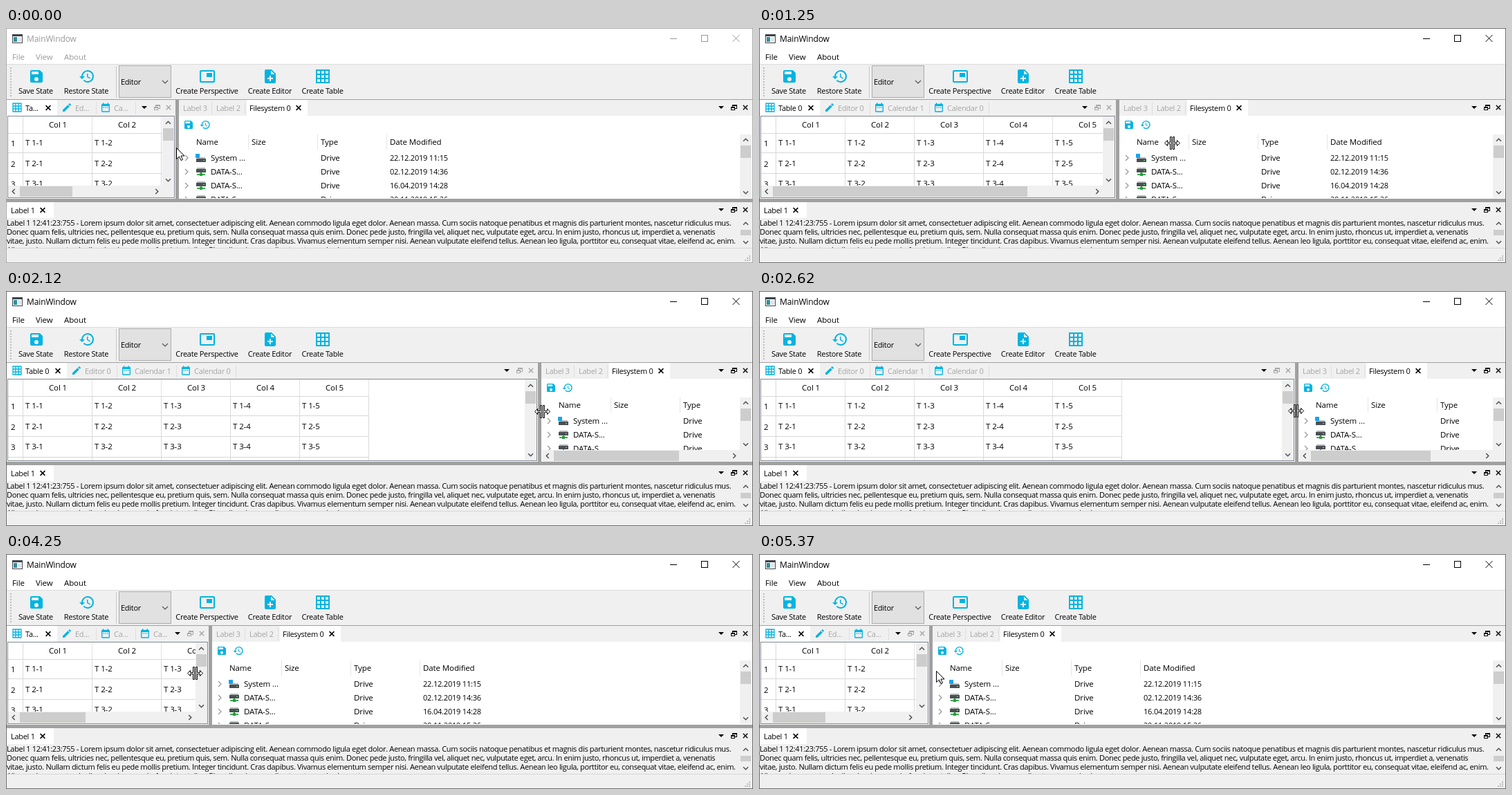
Write an HTML page with a canvas that moves like this. It is 1080x340 px and loops after 6.25 s.

```html
<!DOCTYPE html>
<html lang="en">
<head>
<meta charset="utf-8">
<title>MainWindow</title>
<style>
html, body { margin: 0; width: 100%; height: 100%; overflow: hidden; background: #f0f0f0; }
canvas { display: block; }
</style>
</head>
<body>
<canvas id="stage" width="1080" height="340"></canvas>
<script>
const g = document.getElementById('stage').getContext('2d');
const W = 1080, H = 340, LOOP = 6250, STEP = 125;
const BLUE = '#00b4e1', BG = '#f0f0f0', SPLIT = '#a0a0a0', MUTED = '#a6a6a6';

const FAMILY = '"Open Sans", "Noto Sans", sans-serif';
const UI = ['11.5px ' + FAMILY, '-0.1px'];
const SMALL = ['11px ' + FAMILY, '-0.28px'];
const LOG = ['11px ' + FAMILY, '-0.335px'];

// Splitter positions, one per step; the pointer runs one step ahead.
const OUT = [245, 262, 335, 430, 516, 594, 667, 727, 754, 754, 758, 769, 772, 774, 775, 775, 773];
const BACK = [772, 637, 502, 445, 382, 325, 293, 270, 258, 252, 249, 248, 248, 247, 246, 246, 246];
const OUT_Y = [[0, 174], [4, 166], [8, 174], [15, 173]];
const BACK_Y = [[0, 173], [2, 176], [6, 172], [11, 172], [15, 169]];

const ICON = {
  save: 'M17 3H5a2 2 0 0 0-2 2v14a2 2 0 0 0 2 2h14a2 2 0 0 0 2-2V7zM12 19a3 3 0 1 1 0-6 3 3 0 0 1 0 6zM15 9H5V5h10z',
  history: 'M13 3a9 9 0 0 0-9 9H1l4 4 4-4H6a7 7 0 1 1 2.06 4.94l-1.42 1.42A9 9 0 1 0 13 3zM12 8v5l4.28 2.54.72-1.21-3.5-2.08V8z',
  view: 'M3 3h18a2 2 0 0 1 2 2v14a2 2 0 0 1-2 2H3a2 2 0 0 1-2-2V5a2 2 0 0 1 2-2zM3 5v14h18V5zM11 7h8v6h-8z',
  note: 'M6 2a2 2 0 0 0-2 2v16a2 2 0 0 0 2 2h12a2 2 0 0 0 2-2V8l-6-6zM13 9V3.5L18.5 9zM16 16h-3v3h-2v-3H8v-2h3v-3h2v3h3z',
  pencil: 'M3 17.2V21h3.8L17.8 9.9 14.1 6.2zM20.7 7a1 1 0 0 0 0-1.4l-2.3-2.3a1 1 0 0 0-1.4 0l-1.8 1.8 3.7 3.7z',
  date: 'M19 4h-1V2h-2v2H8V2H6v2H5a2 2 0 0 0-2 2v14a2 2 0 0 0 2 2h14a2 2 0 0 0 2-2V6a2 2 0 0 0-2-2zM19 20H5V9h14zM7 11h2v2H7zM11 11h2v2h-2zM15 11h2v2h-2z',
  grid: 'M2 2h20v20H2z' + [4, 10, 16].map(x => [4, 10, 16].map(y => `M${x} ${y}h4v4h-4z`).join('')).join('')
};
for (const k in ICON) ICON[k] = new Path2D(ICON[k]);

const lerp = (a, b, f) => a + (b - a) * f;
const clamp = (v, a, b) => Math.max(a, Math.min(b, v));

function ramp(keys, k) {
  for (let i = 1; i < keys.length; i++) {
    const [a, u] = keys[i - 1], [b, v] = keys[i];
    if (k <= b) return Math.round(lerp(u, v, (k - a) / (b - a)));
  }
  return keys[keys.length - 1][1];
}

function box(x, y, w, h, color) {
  g.fillStyle = color;
  g.fillRect(x, y, w, h);
}

function frame(x, y, w, h, color) {
  g.strokeStyle = color;
  g.lineWidth = 1;
  g.strokeRect(x + .5, y + .5, w - 1, h - 1);
}

function setFont([font, spacing]) {
  g.font = font;
  g.letterSpacing = spacing;
}

function text(s, x, y, style = UI, color = '#000', align = 'left') {
  setFont(style);
  g.fillStyle = color;
  g.textAlign = align;
  g.fillText(s, x, y);
}

function elide(s, width, style) {
  setFont(style);
  if (g.measureText(s).width <= width) return s;
  let n = s.length - 1;
  while (n > 2 && g.measureText(s.slice(0, n) + '...').width > width) n--;
  return s.slice(0, n) + '...';
}

function icon(name, x, y, size = 24) {
  g.save();
  g.translate(x, y);
  g.scale(size / 24, size / 24);
  g.fillStyle = BLUE;
  g.fill(ICON[name], 'evenodd');
  g.restore();
}

function line(color, width, ...p) {
  g.beginPath();
  for (let i = 0; i < p.length; i += 2) g.lineTo(p[i], p[i + 1]);
  g.strokeStyle = color;
  g.lineWidth = width;
  g.stroke();
}

function poly(p) {
  g.beginPath();
  p.forEach(([x, y]) => g.lineTo(x, y));
  g.closePath();
}

function clipped(x, y, w, h, draw) {
  g.save();
  g.beginPath();
  g.rect(x, y, w, h);
  g.clip();
  draw();
  g.restore();
}

function cross(x, y, r, color, width = 1.5) {
  line(color, width, x - r, y - r, x + r, y + r);
  line(color, width, x + r, y - r, x - r, y + r);
}

// Chevron pointing along (dx, dy).
function chevron(x, y, dx, dy, color = '#505050', r = 3.5, width = 1.5) {
  const h = r / 2;
  line(color, width, x - dx * h - dy * r, y - dy * h - dx * r, x + dx * h, y + dy * h,
    x - dx * h + dy * r, y - dy * h + dx * r);
}

function vbar(x, top, bottom, thumbTop, thumbH, inset = 9) {
  box(x, top, 17, bottom - top, BG);
  chevron(x + 8.5, top + inset, 0, -1);
  chevron(x + 8.5, bottom - 8, 0, 1);
  box(x + 1, thumbTop, 15, thumbH, '#cdcdcd');
}

function hbar(left, right, y, share) {
  box(left, y, right - left, 17, BG);
  chevron(left + 8, y + 8.5, -1, 0);
  chevron(right - 8, y + 8.5, 1, 0);
  box(left + 17, y + 1, Math.round((right - left - 34) * share), 15, '#cdcdcd');
}

function dockButtons(x, y, color) {
  g.fillStyle = '#000';
  poly([[x - 49, y - 2], [x - 41, y - 2], [x - 45, y + 2]]);
  g.fill();
  frame(x - 29, y - 4, 7, 6, color);
  box(x - 29, y - 4, 7, 2, color);
  box(x - 31, y - 1, 6, 5, BG);
  frame(x - 31, y - 1, 6, 5, color);
  box(x - 31, y - 1, 6, 2, color);
  cross(x - 10, y, 3.2, color, 1.4);
}

function windowChrome(active) {
  const fg = active ? '#000' : '#999';
  box(0, 0, W, 52, '#fff');
  box(9, 9, 15, 13, '#3c4248');
  box(10, 12, 13, 9, '#fff');
  box(11, 13, 5, 7, '#2f8f9b');
  box(17, 13, 5, 7, '#dfe5e8');
  text('MainWindow', 30, 20, ['12px ' + FAMILY, '-0.13px'], fg);
  box(960, 15, 10, 1, fg);
  frame(1005, 10, 10, 10, fg);
  cross(1055.5, 15, 5, fg, 1);
  text('File', 9, 46, UI, fg);
  text('View', 43, 46, UI, fg);
  text('About', 84, 46, UI, fg);

  box(0, 52, W, 51, BG);
  box(0, 52, W, 1, '#dcdcdc');
  for (let y = 57; y < 99; y += 4) box(6, y, 2, 2, '#bdbdbd');
  [['save', 32, 'Save State', 43], ['history', 105, 'Restore State', 116],
    ['view', 279, 'Create Perspective', 290.5], ['note', 370, 'Create Editor', 381.5],
    ['grid', 446, 'Create Table', 457.5]].forEach(([name, x, label, cx]) => {
    icon(name, x, 58);
    text(label, cx, 95, SMALL, '#000', 'center');
  });
  box(159, 55, 1, 46, '#c8c8c8');
  box(163, 54, 76, 47, '#e1e1e1');
  frame(163, 54, 76, 47, '#adadad');
  text('Editor', 166, 82, SMALL);
  chevron(230, 78, 0, 1, '#505050', 4, 1.1);
  box(0, 103, W, 215, SPLIT);
}

function tableTabs(s) {
  const f = clamp((s - 294) / 88, 0, 1);
  const tabs = [['grid', 'Table 0', 8, 8], ['pencil', 'Editor 0', 80, 94],
    ['date', 'Calendar 1', 136, 166], ['date', 'Calendar 0', 193, 252], ['', '', 249, 338]];
  const at = i => Math.round(lerp(tabs[i][2], tabs[i][3], f));
  clipped(1, 104, s - 53, 24, () => {
    box(1, 104, at(1) - 7, 23, '#fff');
    for (let i = 0; i < 4; i++) {
      const x = at(i), next = at(i + 1), room = next - x - (i ? 36 : 50);
      icon(tabs[i][0], x, 107, 16);
      const label = f === 1 ? tabs[i][1] : elide(tabs[i][1], room, SMALL);
      text(label, x + 20, 120, SMALL, i ? MUTED : '#000');
      if (i) box(next - 6, 107, 1, 18, '#dedede');
    }
    cross(at(1) - 19, 115.5, 3.4, '#000');
  });
}

function tableDock(s) {
  const right = s - 19, view = right - 24, scroll = view < 500;
  const bottom = scroll ? 228 : 245;
  box(1, 104, s - 1, 143, BG);
  tableTabs(s);
  dockButtons(s, 115, MUTED);
  box(1, 127, s - 1, 120, '#fff');
  clipped(3, 128, right - 3, bottom - 128, () => {
    const edge = Math.min(right, 525);
    for (let c = 1; c <= 5; c++) {
      const x = 24 + c * 100;
      text('Col ' + c, x - 49, 144, UI, '#000', 'center');
      box(x, 128, 1, 24, '#e2e2e2');
      box(x, 152, 1, 94, '#d8d8d8');
      for (let r = 1; r <= 3; r++) text(`T ${r}-${c}`, x - 96, 140 + r * 30 - (r > 2), UI);
    }
    for (let r = 1; r <= 3; r++) {
      text(r, 7, 141 + r * 30 - (r > 2), UI);
      box(3, 150 + r * 30, edge - 3, 1, '#d8d8d8');
    }
    box(3, 152, edge - 3, 1, '#d8d8d8');
    box(24, 128, 1, 118, '#d8d8d8');
  });
  vbar(right, 128, bottom, 145, 18);
  if (scroll) {
    hbar(3, right, bottom, Math.floor(view / 100) / 5);
    box(right, bottom, 17, 17, BG);
  }
  frame(2, 127, s - 3, 119, '#828790');
}

function drive(x, y, system) {
  box(x + 2, y, 12, 2, '#b4b8bb');
  box(x + 1, y + 2, 14, 5, '#4a4f53');
  box(x + 11, y + 4, 2, 1, '#5fe36c');
  if (system) {
    box(x, y - 5, 6, 6, '#18a5e8');
  } else {
    box(x + 7, y + 7, 2, 3, '#35b44a');
    box(x + 2, y + 9, 12, 2, '#35b44a');
    box(x + 6, y + 8, 4, 4, '#2a9a3f');
  }
}

function fileDock(r) {
  const end = 1062, share = (end - r) / 402, bottom = share < 1 ? 230 : 246;
  const cols = [['Name', 25], ['Size', 105], ['Type', 205], ['Date Modified', 305]];
  const dates = ['22.12.2019 11:15', '02.12.2019 14:36', '16.04.2019 14:28', '20.11.2019 15:36'];
  box(r, 104, W - 1 - r, 143, BG);
  box(r + 98, 104, 88, 23, '#fff');
  box(r + 47, 107, 1, 18, '#dedede');
  box(r + 95, 107, 1, 18, '#dedede');
  text('Label 3', r + 6, 120, SMALL, MUTED);
  text('Label 2', r + 54, 120, SMALL, MUTED);
  text('Filesystem 0', r + 102, 120, SMALL);
  cross(r + 173, 115.5, 3.4, '#000');
  dockButtons(1079, 115, '#000');
  box(r, 127, W - 1 - r, 120, '#fff');
  icon('save', r + 6, 132, 16);
  icon('history', r + 30, 132, 16);
  clipped(r, 154, end - r, bottom - 154, () => {
    cols.forEach(([label, x], i) => {
      text(label, r + x, 169, UI);
      if (i) box(r + x - 5, 154, 1, 22, '#e5e5e5');
    });
    dates.forEach((date, i) => {
      const y = 188 + i * 20;
      chevron(r + 11, y, 1, 0, '#999', 4, 1.3);
      drive(r + 24, y - (i ? 6 : 1), !i);
      text(i ? 'DATA-S...' : 'System ...', r + 46, y + 4, UI);
      text('Drive', r + 205, y + 4, UI);
      text(date, r + 305, y + 4, ['11px ' + FAMILY, '-0.2px']);
    });
  });
  vbar(end - 1, 154, bottom, 170, 18, 8);
  if (share < 1) {
    hbar(r + 1, end - 1, bottom, share);
    box(end - 1, bottom, 17, 17, BG);
  }
}

function logDock() {
  const lines = [
    'Label 1 12:41:23:755 - Lorem ipsum dolor sit amet, consectetuer adipiscing elit. Aenean commodo ligula eget dolor. Aenean massa. Cum sociis natoque penatibus et magnis dis parturient montes, nascetur ridiculus mus.',
    'Donec quam felis, ultricies nec, pellentesque eu, pretium quis, sem. Nulla consequat massa quis enim. Donec pede justo, fringilla vel, aliquet nec, vulputate eget, arcu. In enim justo, rhoncus ut, imperdiet a, venenatis',
    'vitae, justo. Nullam dictum felis eu pede mollis pretium. Integer tincidunt. Cras dapibus. Vivamus elementum semper nisi. Aenean vulputate eleifend tellus. Aenean leo ligula, porttitor eu, consequat vitae, eleifend ac, enim.',
    'Aliquam lorem ante, dapibus in, viverra quis, feugiat a, tellus. Phasellus viverra nulla ut metus varius laoreet.'
  ];
  box(1, 252, W - 2, 66, BG);
  box(1, 252, 68, 23, '#fff');
  text('Label 1', 7, 268, SMALL);
  cross(53, 263.5, 3.4, '#000');
  dockButtons(1079, 263, '#000');
  clipped(1, 275, 1060, 43, () => lines.forEach((s, i) => text(s, 1, 286 + i * 13, LOG)));
  vbar(1061, 275, 318, 292, 8, 8);
}

function statusBar(active) {
  box(0, 318, W, 22, BG);
  box(0, 318, W, 1, '#d7d7d7');
  for (let i = 0; i < 3; i++)
    for (let j = 0; j <= i; j++) box(1074 - j * 3, 329 + i * 3, 2, 2, '#bfbfbf');
  frame(0, 0, W, H, active ? '#6b6b6b' : '#aaa');
}

function pointer(x, y, resize) {
  g.save();
  g.translate(x + .5, y + .5);
  g.fillStyle = '#fff';
  g.strokeStyle = '#000';
  g.lineWidth = 1;
  const half = [[1, -9], [3, -9], [3, -1], [7, -1], [7, -4], [11, 0], [7, 4], [7, 1], [3, 1], [3, 9], [1, 9]];
  const arrow = [[0, 0], [0, 16], [4, 12.5], [6.5, 18], [9, 17], [6.5, 11.5], [11.5, 11.5]];
  const parts = resize ? [half, half.map(([a, b]) => [-a, b])] : [arrow];
  parts.forEach(p => {
    poly(p);
    g.fill();
    g.stroke();
  });
  g.restore();
}

function stateAt(t) {
  t += 5;
  if (t < 750) return { s: 245, x: 246, y: 173, resize: false, active: false };
  const back = t >= 3500, pos = back ? BACK : OUT;
  const k = Math.min(15, Math.floor((t - (back ? 3500 : 750)) / STEP));
  const off = back && k >= 12;
  return {
    s: pos[k],
    x: off ? Math.round(lerp(251, 256, (k - 11) / 4)) : pos[k + 1] + 3,
    y: ramp(back ? BACK_Y : OUT_Y, k),
    resize: !off,
    active: true
  };
}

function draw() {
  const { s, x, y, resize, active } = stateAt(performance.now() % LOOP);
  windowChrome(active);
  tableDock(s);
  fileDock(s + 5);
  logDock();
  statusBar(active);
  pointer(x, y, resize);
  requestAnimationFrame(draw);
}
draw();
</script>
</body>
</html>
```
